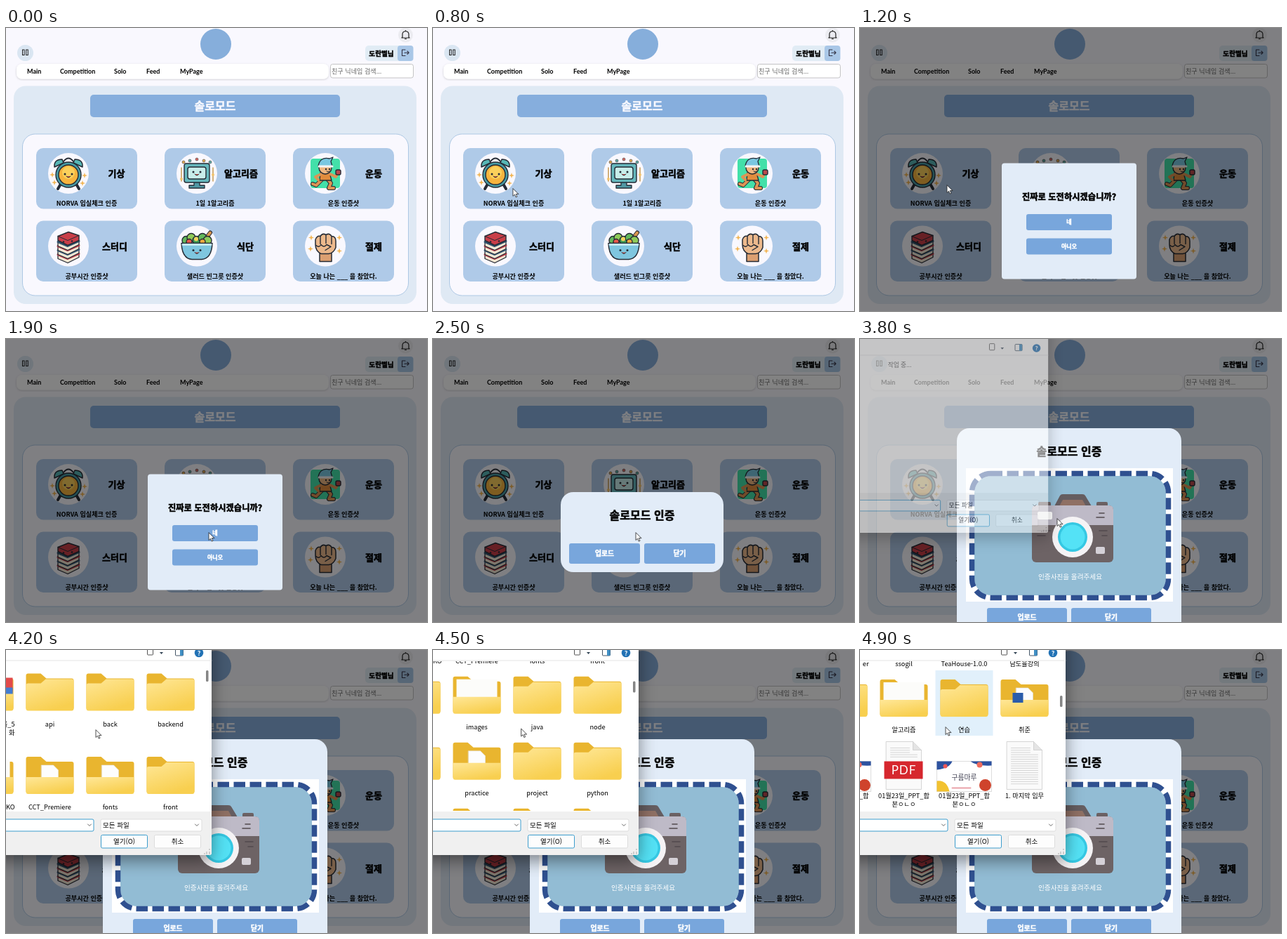
These frames come from a looping animation (600 px wide and 403 px high, 5000 ms). An HTML page:

```html
<!DOCTYPE html>
<html lang="ko">
<head>
<meta charset="utf-8">
<style>
html, body { margin: 0; height: 100%; overflow: hidden; background: #f9f8fe; }
svg { display: block; width: 100vw; height: 100vh; }
text { white-space: pre; }
</style>
</head>
<body>
<svg id="stage" viewBox="0 0 600 403" text-anchor="middle" font-family="'Noto Sans CJK KR','Noto Sans CJK',sans-serif"></svg>
<script>
const box = (x, y, w, h, fill, r = 0, more = '') =>
  `<rect x="${x}" y="${y}" width="${w}" height="${h}" rx="${r}" fill="${fill}" ${more}/>`;
const disc = (x, y, r, fill, more = '') => `<circle cx="${x}" cy="${y}" r="${r}" fill="${fill}" ${more}/>`;
const path = (d, fill = 'none', stroke = 'none', w = 1) =>
  `<path d="${d}" fill="${fill}" stroke="${stroke}" stroke-width="${w}" stroke-linejoin="round" stroke-linecap="round"/>`;
const text = (x, y, size, str, more = '') => `<text x="${x}" y="${y}" font-size="${size}" ${more}>${str}</text>`;
const group = (body, more) => `<g ${more}>${body}</g>`;
const heavy = (fill = '#000') => `font-weight="900" fill="${fill}" stroke="${fill}" stroke-width=".5"`;
const LEFT = 'text-anchor="start"', WHITE = 'fill="#fff"';
const INK = '#252b35', edge = `stroke="${INK}" stroke-width="1.4"`;

// Card pictures, centred on 0,0
const spark = (x, y) => path(`M${x} ${y - 4}l1 3 3 1-3 1-1 3-1-3-3-1 3-1z`, '#f2b553');
const face = y => disc(-5, y, 1.5, INK) + disc(5, y, 1.5, INK) + path(`M-3 ${y + 3}q3 4 6 0`, '#c84b43', INK);

const clock = spark(-23, 2) + spark(23, 3) + spark(-20, 13) + spark(20, 14) +
  path('M-11 15l-4 7M11 15l4 7', 'none', INK, 4) +
  path('M-7-17q7-9 14 0', 'none', INK, 2) +
  path('M-20-9q-1-11 11-11l2 5zM20-9q1-11-11-11l-2 5z', '#57b6b5', INK, 1.5) +
  disc(0, 2, 18, '#489ca5', edge) + disc(0, 2, 14, '#f7b43e', edge) + disc(0, -1, 9, '#fbd05b') + face(1);

const computer = [-19, -10, 0, 10, 19].map((x, i) =>
    disc(x, -20 + Math.abs(i - 2) * 2, 2, ['#e8aa4c', '#5aaba5', '#d9655f'][i % 3], 'stroke="#555" stroke-width=".7"')).join('') +
  path('M-22-8v19M23-8v19', 'none', '#c79a54', 1.5) +
  disc(-22, 8, 2, '#f2c46d') + disc(23, 2, 2, '#f2c46d') +
  path('M-4 11h8v6h7v4h-22v-4h7z', '#5199a4', INK, 1.3) +
  box(-18, -14, 36, 27, '#66b8bd', 3, edge) + box(-13, -9, 26, 17, '#c8edea', 3, edge) + face(-2);

const runner = box(-21, -21, 42, 42, '#43e0a9', 4) +
  path('M-4 8l-9 9-5-2M3 8l5 6-3 7h7', 'none', INK, 6) +
  path('M-4 8l-9 9-5-2M3 8l5 6-3 7h7', 'none', '#dc9455', 4) +
  path('M-7-1h13l3 11h-17z', '#e28c3c', INK, 1.3) +
  path('M7 1l8 4 3-5M-6 1l-8 4 4 4', 'none', '#dc9455', 4) +
  box(15, -5, 7, 7, '#b9494c', 2, edge) + disc(0, -8, 9, '#efb780', edge) +
  path('M-10-10q2-14 16-11l5-2-3 6 2 7z', '#7ac7e1', INK, 1.3) +
  path('M-9-10h19', 'none', '#f4f4f4', 3) + disc(1, -6, 1.2, INK) + disc(6, -6, 1.2, INK) + path('M2-3q2 2 4 0', 'none', INK);

const layer = (y, fill) => path(`M-15 ${y}l14 6 16-7v5l-16 8-14-6z`, '#f2e7d3', INK, 1.3) +
  path(`M-15 ${y}l14 6 16-7`, 'none', fill, 3);
const books = layer(12, '#c13c48') + layer(6, '#3d6585') + layer(0, '#c13c48') + layer(-6, '#31536d') +
  path('M-15-14l15-6 15 5v7l-16 7-14-7z', '#c93e48', INK, 1.4) + path('M-15-14l14 6 16-7', 'none', INK) +
  disc(-7, -6, 1.3, INK) + disc(5, -7, 1.3, INK);

const salad = path('M10-7l9-12', 'none', INK, 6) + path('M10-7l9-12', 'none', '#d99650', 4) +
  [-15, -8, 0, 8, 15].map((x, i) => disc(x, -8 - (i % 2) * 4, 6, ['#62b85b', '#8fcb59', '#3c9a54'][i % 3], edge)).join('') +
  disc(-11, -6, 4, '#e9584a', edge) + disc(8, -6, 4, '#f0aa3e', edge) + disc(-1, -10, 3, '#f3d25d') +
  path('M-22-4h44q-1 22-15 23h-14q-14-1-15-23z', '#7fc6df', INK, 1.5) + path('M-20-2h40', 'none', '#c3e9f4', 3) + face(6);

const fist = [[-20, -12], [20, -12], [-21, 4], [20, 7]].map(p => spark(...p)).join('') +
  path('M-8 8h17v14h-17z', '#dca071', INK, 1.5) +
  path('M-14-9q2-6 7-5 3-5 8-2 5-3 8 2 6 0 6 7v9q-3 8-10 9h-11q-8-4-8-13z', '#ecb98c', INK, 1.5) +
  path('M-7-13v10M1-15v11M9-13v10M-13-1q4 4 7-1 4 5 8 0l6 3-8 5', 'none', INK, 1.4);

// Page
const cards = [
  ['기상', 157.5, 'NORVA 입실체크 인증', clock], ['알고리즘', 335, '1일 1알고리즘', computer],
  ['운동', 524, '운동 인증샷', runner], ['스터디', 155, '공부시간 인증샷', books],
  ['식단', 341, '샐러드 빈그릇 인증샷', salad], ['절제', 524, '오늘 나는 ___ 을 참았다.', fist]
].map(([name, nx, note, art], i) => {
  const x = 43 + i % 3 * 183, y = i < 3 ? 171 : 274.5;
  return box(x, y, 144, 86.5, '#afcae8', 10) + disc(x + 46, y + 36, 29, '#f9f8fe') +
    group(art, `transform="translate(${x + 46} ${y + 36})"`) +
    text(nx, y + 41, 13, name, heavy()) + text(x + 72, y + 82, 9.1, note, 'font-weight="700"');
}).join('');

const menu = [['Main', 30], ['Competition', 77], ['Solo', 154], ['Feed', 200], ['MyPage', 248]]
  .map(([s, x]) => text(x, 65, 9, s, LEFT + ' font-weight="700" font-family="Lato,sans-serif"')).join('');

const page = box(0, 0, 600, 403, '#f9f8fe') + disc(299, 23, 22, '#86aedb') +
  disc(27.5, 35.5, 11.5, '#dae6f2') +
  box(23.5, 31, 2.6, 7.5, 'none', 0, 'stroke="#222"') + box(28.7, 31, 2.6, 7.5, 'none', 0, 'stroke="#222"') +
  disc(569.5, 10, 10.5, '#ececf1') +
  path('M565 13v-4q0-4 4.5-4.5 4.5.5 4.5 4.5v4l1 1h-11zM569.5 3.5v1M568.5 15.5h2', 'none', '#222', 1.2) +
  box(512, 25, 68, 22, '#e1ecf5', 5) + box(558, 25, 22.5, 22, '#a9c7e7', 4) +
  text(535, 39.5, 9.6, '도란별님', heavy()) +
  path('M569 31h-4.5v8.5h4.5M568 35.2h6M572 33l2.2 2.2-2.2 2.2', 'none', '#334', 1.1) +
  box(15, 51, 445, 21.5, '#fff', 8, 'filter="url(#soft)"') + menu +
  box(462.5, 51.5, 118, 19.5, '#fff', 3, 'stroke="#b5b5b5" stroke-width=".8"') +
  text(464, 64.5, 9.1, '친구 닉네임 검색...', LEFT + ' fill="#666"') +
  box(11, 82.5, 574, 310.5, '#dfe9f4', 17) + box(120, 95, 356, 32, '#86aedd', 5) +
  text(298, 116.5, 16, '솔로모드', heavy('#f7f8fe')) +
  box(23.5, 151, 550, 230, '#f9f8fe', 18, 'stroke="#adc8e4"') + cards;

// Modals
const PALE = '#e2ecf8';
const button = (x, y, w, h, label, size) =>
  box(x, y, w, h, '#78a6dc', 3) + text(x + w / 2, y + h / 2 + size * .36, size, label, heavy('#fff'));
const ask = box(202, 192.5, 192, 165, PALE, 4) +
  text(298, 244.5, 12.3, '진짜로 도전하시겠습니까?', heavy()) +
  button(237, 265, 122, 23, '네', 8) + button(237, 299.5, 122, 23, '아니오', 8);
const small = box(182, 218, 232, 114, PALE, 18) + text(298, 257, 16, '솔로모드 인증', heavy()) +
  button(194, 291, 101, 29, '업로드', 9.8) + button(301, 291, 101, 29, '닫기', 9.8);
const camera = box(254, 232, 18, 10, '#6b6163', 2) + box(337, 232, 16, 10, '#6b6163', 2) +
  path('M277 238l8-15q1-2 4-2h28q3 0 4 2l9 15z', '#655d60') + path('M284 238l5-9h28l5 9z', '#8f7064') +
  box(245, 237, 116, 81, '#6d6365', 6) + path('M245 265v-22q0-6 6-6h104q6 0 6 6v22z', '#bebac7') +
  box(253, 246, 21, 11, '#fff', 2) + box(336, 296, 13, 10, '#d5d1d7', 2) +
  path('M341 248h7M337 254h11M253 273h18M253 280h11M341 273h11M345 280h7', 'none', '#514a4d', 1.6) +
  disc(303, 282, 29, '#f5f3f5') + disc(303, 282, 21, '#35c8e3') + disc(303, 282, 17.5, '#54e2f6');
const upload = box(138, 127, 320, 300, PALE, 18) + text(298, 165.5, 16, '솔로모드 인증', heavy()) +
  box(151, 184, 295, 190, '#fff') + box(163, 195, 273, 170, '#92bcd4', 24) +
  box(159.5, 191.5, 280, 177, 'none', 27, 'stroke="#2f5090" stroke-width="7.5" stroke-dasharray="16.5 6.5"') +
  camera + text(299.5, 342, 9.6, '인증사진을 올려주세요', WHITE) +
  button(181, 383, 114, 27, '업로드', 9.8) + button(301, 383, 114, 27, '닫기', 9.8);

// File dialog; items hang above the middle of their label
const folder = (inner = '') => path('M-34-22v-47q0-3 3-3h18l8 7h36q3 0 3 3v40z', '#e9b52f') + inner;
const lip = path('M-34-43h68v21q0 3-3 3h-62q-3 0-3-3z', 'url(#gold)');
const plain = folder(path('M-34-22v-33q0-3 3-3h18l7-6h37q3 0 3 3v39q0 3-3 3h-62q-3 0-3-3z', 'url(#gold)'));
const paper = folder(path('M-12-60h17l7 7v18h-24z', '#fdfdfd', '#ddd', .6) + lip);
const wide = folder(box(-29, -68, 58, 30, '#fcfcfa') + lip);
const word = paper + box(-17, -53, 15, 14, '#2a5caa');
const sheet = path('M-25-77h38l12 12v56h-50z', '#fafafa', '#ccc', .8) + path('M13-77v12h12', '#e4e4e4', '#ccc', .8);
const lines = n => path(Array.from({ length: n }, (_, i) => `M-19 ${-68 + i * 3.2}h${i < 3 ? 27 : 38}`).join(''), 'none', '#ccc', .8);
const pdf = sheet + lines(5) + box(-28, -49, 55, 25, '#d6272e') +
  text(0, -30.5, 17, 'PDF', 'letter-spacing="1" fill="#fff" font-family="Lato,sans-serif"');
const slide = box(-39, -49, 78, 43, '#fff', 0, 'stroke="#ddd"') + path('M-39-49h22q-4 10-22 12zM39-49h-30q8 7 30 6z', '#2d52a0') +
  path('M-39-6v-15q14-2 18 15z', '#f2c230') + disc(-27, -42, 3, '#ed5858') + disc(22, -44, 4, '#ef6c5d') +
  path('M-17-11h26', 'none', '#e9a1a8', 2) + text(0, -23, 9.8, '구름마루', 'fill="#445"') + disc(30, -15, 8.5, '#cf432c');
const colorful = folder(box(10, -66, 23, 20, '#e24a4a') + box(10, -52, 23, 30, '#437cd1') + lip);
const docs = '01월23일_PPT_합|본ㅇㄴㅇ';

const rows = [
  [105.5, ['울_5|화', colorful], ['api', plain], ['back', plain], ['backend', plain]],
  [224, ['KO', wide], ['CCT_Premiere', paper], ['fonts', paper], ['front', plain]],
  [318, ['', plain], ['images', wide], ['java', plain], ['node', plain]],
  [412, ['', plain], ['practice', paper], ['project', plain], ['python', plain]],
  [506, ['er', plain], ['ssogil', plain], ['TeaHouse-1.0.0', wide], ['남도율강의', paper]],
  [600, ['', plain], ['알고리즘', wide], ['연습', plain], ['취준', word]],
  [693.5, ['_합', slide], [docs, pdf], [docs, slide], ['1. 마지막 임무', sheet + lines(17)]]
].map(([y, ...items]) => items.map(([label, art], i) => {
  const mark = label === '연습' ? box(-41, -85, 82, 93, '#e1f0fb') : '';
  // The first column is cut by the stage, so its names end flush right
  const names = label.split('|').map((s, n) =>
    text(i ? 0 : 36, 3 + n * 12.3, 9.2, s, i ? '' : 'text-anchor="end"')).join('');
  return group(mark + art + names, `transform="translate(${-23.5 + i * 86} ${y})"`);
}).join('')).join('');

const dialog = box(-300, -60, 593, 352, '#f0f0f0', 4, 'filter="url(#shade)"') + box(-300, -60, 593, 75, '#fff') +
  box(-300, 15, 593, 215, '#fff') +
  box(201.5, -3, 8, 10, 'none', 1, 'stroke="#555"') + path('M219 3h5l-2.5 3z', '#345') +
  box(241.5, -2, 11, 10, '#fff', 1, 'stroke="#456"') + box(248, -2, 4.5, 10, '#3f8ec4') +
  disc(275, 4, 6.3, '#2272b5') + text(275, 7.5, 9, '?', WHITE + ' font-weight="700"') +
  path('M0 15h293', 'none', '#ddd', .8) +
  group(text(43, 34, 9.5, '작업 중...', LEFT + ' fill="#555"'), 'id="busy"') +
  group(group(rows, 'id="rows"'), 'id="list" clip-path="url(#view)"') + box(285, 29, 3.5, 16, '#858585', 1.5, 'id="thumb"') +
  box(-300, 230, 593, 62, '#f0f0f0', 3) +
  box(-200, 241, 325, 17, '#fff', 2, 'stroke="#3c9dcd"') + box(135, 241, 144, 17, '#fff', 2, 'stroke="#ddd"') +
  path('M116.5 248l2.5 2.5 2.5-2.5M269.5 248l2.5 2.5 2.5-2.5', 'none', '#666') +
  text(138, 252.5, 9.5, '모든 파일', LEFT) +
  box(135.5, 263.5, 66, 18.5, '#fdfdfd', 2, 'stroke="#3c9dcd"') + text(168.5, 276, 9.5, '열기(O)') +
  box(211.5, 263.5, 66, 18.5, '#fdfdfd', 2, 'stroke="#ddd"') + text(244.5, 276, 9.5, '취소') +
  path('M290 284v0M290 288v0M286 288v0M290 290v0M286 290v0M283 290v0', 'none', '#999', 1.5);

document.getElementById('stage').innerHTML = `<defs>
  <filter id="soft"><feDropShadow dx="0" dy="1" stdDeviation="1.5" flood-opacity=".18"/></filter>
  <filter id="shade" y="-.2" height="1.4"><feDropShadow dx="0" dy="8" stdDeviation="12" flood-opacity=".45"/></filter>
  <linearGradient id="gold" x2=".5" y2="1"><stop stop-color="#ffe797"/><stop offset="1" stop-color="#f8cf4f"/></linearGradient>
  <clipPath id="view"><rect y="16" width="284" height="213"/></clipPath></defs>` +
  page + box(0, 0, 600, 403, '#000', 0, 'id="dim" opacity=".49"') +
  group(ask, 'id="ask"') + group(small, 'id="small"') + group(upload, 'id="upload"') + group(dialog, 'id="dialog"') +
  group(path('M0 0v10.5l2.5-2.3 1.7 3.9 1.8-.8-1.7-3.7h3.3z', '#fff', '#222', .8), 'id="cursor"');

// Timeline
const $ = id => document.getElementById(id);
const show = (id, on) => $(id).setAttribute('visibility', on ? 'visible' : 'hidden');
const move = (id, v) => $(id).setAttribute('transform', v);
const clamp = v => Math.max(0, Math.min(1, v));
const ease = v => v * v * (3 - 2 * v);
const route = [[300, -12, 290], [900, 124, 224], [1300, 124, 224], [1800, 289, 276], [2700, 289, 276],
  [3000, 268, 296], [3600, 281, 256], [3800, 281, 256], [4200, 128, 114], [4900, 122, 110]];

function cursorAt(t) {
  const i = Math.max(1, route.findIndex(p => p[0] >= t));
  const [t0, x0, y0] = route[i - 1], [t1, x1, y1] = route[i];
  const k = ease(clamp((t - t0) / (t1 - t0)));
  return [x0 + (x1 - x0) * k, y0 + (y1 - y0) * k];
}

function draw(now) {
  const t = Math.floor(now % 5000 / 100) * 100;
  show('dim', t >= 1100);
  show('ask', t >= 1100 && t < 2300);
  show('small', t >= 2300 && t < 2600);
  show('upload', t >= 2600);
  const open = clamp((t - 3700) / 200), scroll = clamp((t - 4200) / 700);
  $('dialog').setAttribute('opacity', open === 1 ? 1 : open * 1.1);
  move('dialog', `translate(6 108) scale(${.826 + .174 * open}) translate(-6 -108)`);
  show('busy', t < 4000);
  show('list', t >= 4000);
  show('thumb', t >= 4000);
  move('rows', `translate(0 ${-486 * scroll})`);
  move('thumb', `translate(0 ${36 * scroll})`);
  move('cursor', `translate(${cursorAt(t)})`);
  requestAnimationFrame(draw);
}
draw(performance.now());
</script>
</body>
</html>
```
